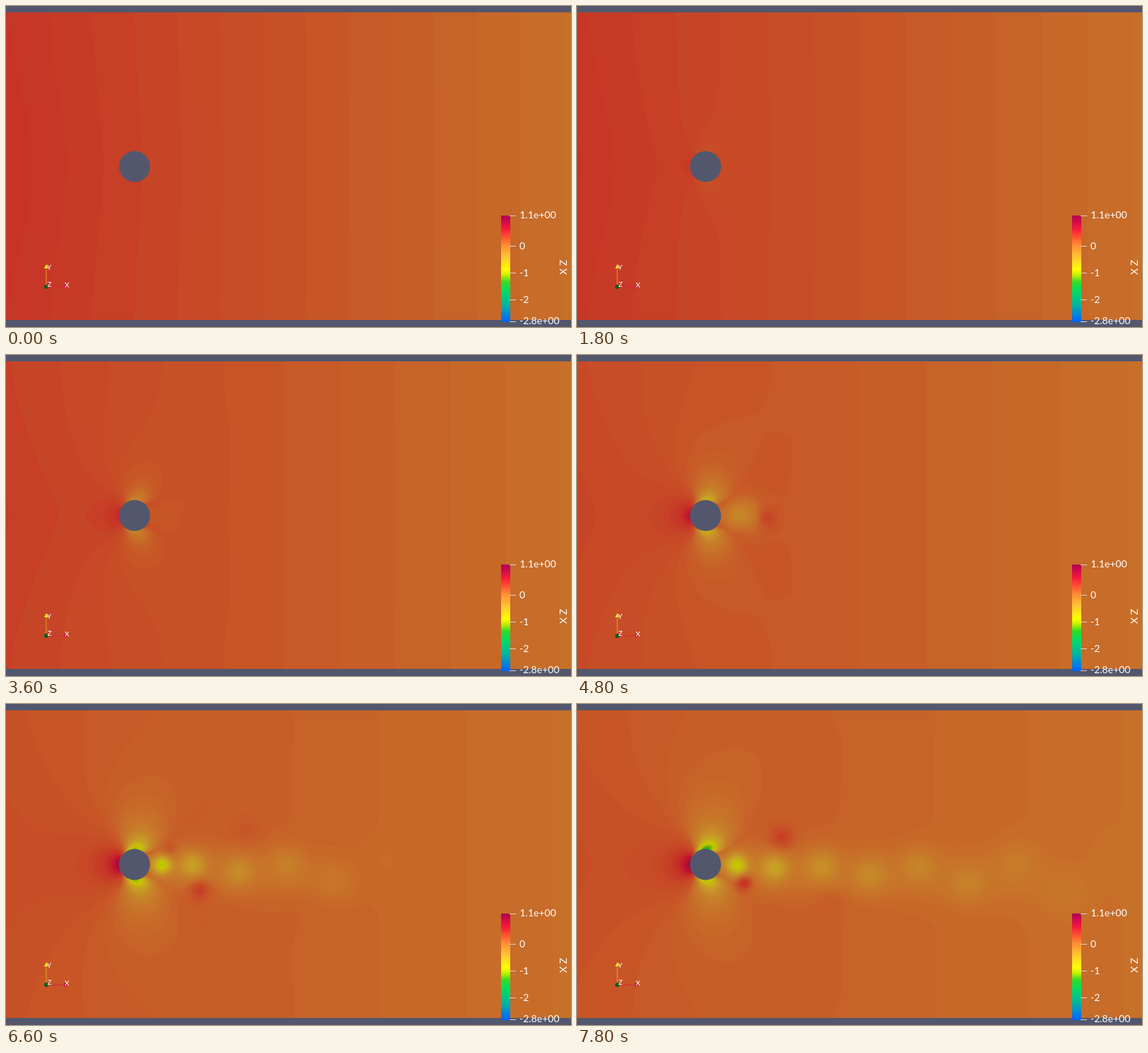
These frames come from a looping animation (800 by 455 pixels, 8 s). An HTML page with a canvas:

```html
<!DOCTYPE html>
<html lang="en">
<head>
<meta charset="utf-8">
<title>Flow past a cylinder</title>
<style>
  html, body { margin: 0; width: 100%; height: 100%; overflow: hidden; background: #52576e; }
  canvas, svg { position: absolute; left: 0; top: 0; }
  text { fill: #fff; font-family: Lato, sans-serif; font-size: 14px; }
  .axis text { font-size: 10px; }
</style>
</head>
<body>
<canvas id="stage" width="800" height="455"></canvas>
<svg width="800" height="455" viewBox="0 0 800 455">
  <circle cx="182" cy="227.5" r="22" fill="#52576e"/>
  <path d="M713 297.5h9M713 340.5h9M713 378.5h9M713 416.5h9M713 447.5h9" stroke="#ddd0d0"/>
  <text x="727.5" y="301">1.1e+00</text>
  <text x="727" y="344.5">0</text>
  <text x="727" y="382.5">-1</text>
  <text x="727" y="421">-2</text>
  <text x="727" y="451">-2.8e+00</text>
  <text transform="translate(794 381) rotate(-90)">X Z</text>
  <g class="axis">
    <path d="M57 398V373" stroke="#e8a028"/>
    <path d="M57 398H82" stroke="#dc1e3c"/>
    <path d="M57 366l3 6h-6z" fill="#f0e628"/>
    <path d="M88 398l-6 -3v6z" fill="#d2143c"/>
    <circle cx="57" cy="398" r="3" fill="#0a5a1e"/>
    <text x="58" y="374">Y</text>
    <text x="83" y="398.5">X</text>
    <text x="58.5" y="398">Z</text>
  </g>
</svg>
<script>
const W = 800, TOP = 9, H = 436, STEP = 600, LOOP = 8000, STEPS = 14;
const CX = 182, CY = 227.5, R = 22;
const P_MAX = 1.1, P_MIN = -2.8, BAND = 0.029, SHADE = 0.78;
const SHED = 8.5, PERIOD = 0.615;   // first vortex and spacing, in steps
const ctx = document.getElementById('stage').getContext('2d');

const { exp, sqrt, min, max, floor, ceil, sin, PI } = Math;
const rise = x => 1 / (1 + exp(-x));

const ramp = {
  1.1: '#b00055', 0.6: '#f7193e', 0.4: '#ff4132', 0.22: '#ff6331', 0: '#ff8e34',
  '-0.45': '#ffc832', '-0.9': '#ffff00', '-1.1': '#c0f000', '-1.35': '#32dc28',
  '-1.7': '#00dc64', '-2.2': '#00b4a0', '-2.8': '#0064ff'
};

function rampFill(c, x0, y0, x1, y1) {
  const g = c.createLinearGradient(x0, y0, x1, y1);
  for (const p in ramp) g.addColorStop((P_MAX - p) / (P_MAX - P_MIN), ramp[p]);
  return g;
}

// field colours: the shaded ramp, stepped where the gradient is shallow
const SIZE = 1170;
const palette = (() => {
  const c = Object.assign(document.createElement('canvas'), { width: SIZE, height: 1 }).getContext('2d');
  c.fillStyle = rampFill(c, 0, 0, SIZE, 0);
  c.fillRect(0, 0, SIZE, 1);
  return c.getImageData(0, 0, SIZE, 1).data.map((v, i) => i % 4 < 3 ? v * SHADE : v);
})();

function colorIndex(p) {
  if (p > -0.03 && p < 0.42) p = (floor(p / BAND - 0.2) + 0.7) * BAND;
  return max(0, min(SIZE - 1, floor((P_MAX - p) / (P_MAX - P_MIN) * SIZE)));
}

// a shed vortex speeds up to the free stream
const drift = age => 220 + 112 * (age - 0.3 * (1 - exp(-age / 0.3)));

// low-pressure cores, each with a short-lived high-pressure spot on alternate sides
function blobsAt(s) {
  const start = exp(-(((s - 8) / 1.4) ** 2));
  const out = [
    { x: 236, y: 226, r: 24, a: -0.3 * start },
    { x: 250 + 9 * (s - 6), y: 230, r: 13, a: 0.2 * start }
  ];
  for (let k = -1; SHED + k * PERIOD <= s; k++) {
    const age = s - SHED - k * PERIOD, side = k % 2 ? -1 : 1;
    const strength = 1.15 * (1 - exp(-(k + 1.3) / 2.5));
    const x = drift(age);
    out.push({
      x, y: CY + age * (4 + 5.5 * side * 0.85 ** k),
      r: 11 + 9 * sqrt(age), a: -strength * (0.2 + 0.75 * exp(-age / 0.7))
    }, {
      x: x + 10, y: CY - side * (20 + 22 * age),
      r: 10 + 8 * age, a: 4 * strength * age * exp(-age / 0.3)
    });
  }
  return out;
}

// stagnation in front of the cylinder, suction at its sides leaning downstream
function around(dx, dy, force, lift) {
  const q = R * R / max(dx * dx + dy * dy, R * R);
  const lx = dx - 14 * (1 - q);
  const c = (lx * lx - dy * dy) / (lx * lx + dy * dy + 1);
  const suction = 1.25 * force * (1 - lift * Math.sign(dy));
  if (c < 0) return suction * c * (1.9 * q - 0.5 * q ** 3);
  return dx < 0 ? force * c * (1.25 * q - 0.25 * q * q) : -suction * 0.15 * q * c;
}

function build(s) {
  const left = 0.165 + 0.225 * rise((6.7 - s) / 2);
  const force = s ? 0.8 * rise((s - 7.3) / 1.6) : 0;
  const lift = -0.18 * sin(PI * (s - SHED) / PERIOD) * max(0, (s - 9) / 4);
  const front = drift(max(0, s - SHED));
  const p = new Float32Array(W * H);

  for (let x = 0; x < W; x++) {
    const base = left * (1 - x / W), inlet = 0.025 * exp(-x / 120);
    const wake = -0.25 * force * rise((x - 205) / 8) * rise((front - x) / 25) * exp(-max(0, x - 200) / 350);
    const axis = 4 + max(0, x - 200) * 0.04;
    for (let y = 0; y < H; y++) {
      const dy = y + TOP + 0.5 - CY;
      p[y * W + x] = base + inlet * exp(-((dy / 130) ** 2))
        + wake * exp(-(((dy - axis) / 36) ** 2)) + around(x + 0.5 - CX, dy, force, lift);
    }
  }

  for (const b of blobsAt(s)) {
    const reach = 2.6 * b.r, by = b.y - TOP;
    const x1 = min(W, ceil(b.x + reach)), y1 = min(H, ceil(by + reach));
    for (let y = max(0, floor(by - reach)); y < y1; y++) {
      for (let x = max(0, floor(b.x - reach)); x < x1; x++) {
        p[y * W + x] += b.a * exp(-((x - b.x) ** 2 + (y - by) ** 2) / (b.r * b.r));
      }
    }
  }

  const img = ctx.createImageData(W, H);
  p.forEach((v, i) => {
    const c = 4 * colorIndex(v);
    for (let n = 0; n < 4; n++) img.data[4 * i + n] = palette[c + n];
  });
  return img;
}

const cache = [];
const field = s => cache[s] ??= build(s);
const bar = rampFill(ctx, 0, 297, 0, 447);
let shown = -1;

function tick() {
  const s = floor(performance.now() % LOOP / STEP);
  if (s !== shown) {
    ctx.putImageData(field(s), 0, TOP);
    ctx.fillStyle = bar;
    ctx.fillRect(701, 297, 13, 150.5);
    shown = s;
  } else {
    field((s + 1) % STEPS);
  }
  requestAnimationFrame(tick);
}
tick();
</script>
</body>
</html>
```
